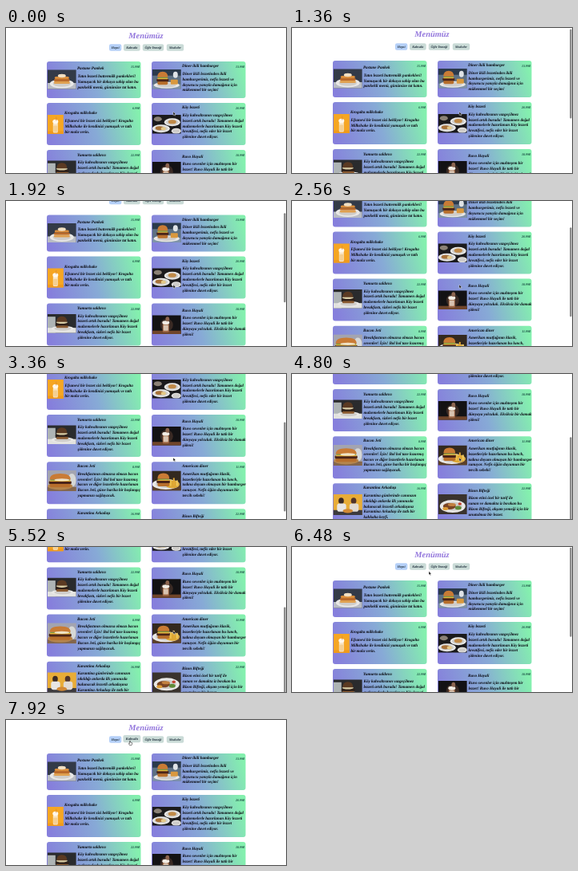
Animation, 350 px wide and 182 px high, one loop 8000 ms. Source, as an HTML page:

```html
<!DOCTYPE html>
<html lang="tr">
<head>
<meta charset="utf-8">
<title>Menümüz</title>
<style>
html, body { margin: 0; width: 100%; height: 100%; overflow: hidden; background: #fff; }
svg { display: block; width: 100vw; height: 100vh; }
text { font: italic bold 5.2px "Liberation Serif", "Noto Serif", serif; letter-spacing: -.06px; fill: #08080e; text-rendering: geometricPrecision; }
.heading { font-size: 10.4px; letter-spacing: 0; fill: #9275dc; text-anchor: middle; }
.label { font-size: 4.2px; text-anchor: middle; fill: #23333f; }
.price { font-size: 4.2px; text-anchor: end; fill: #1c5145; }
</style>
</head>
<body>
<svg id="stage" viewBox="0 0 350 182" xmlns="http://www.w3.org/2000/svg">
  <defs>
    <linearGradient id="card" x1="0" y1=".56" x2="1" y2=".44">
      <stop offset="0" stop-color="#867fdc"/>
      <stop offset=".5" stop-color="#87aad6"/>
      <stop offset="1" stop-color="#84f0ae"/>
    </linearGradient>
  </defs>
  <g id="page"></g>
  <rect id="thumb" x="347.4" width="2" height="112" rx="1" fill="#777"/>
  <g id="pointer">
    <path id="arrow" d="M0 0V4.6L1.1 3.6 1.9 5.2 2.6 4.9 1.9 3.3H3.3Z" fill="#111" stroke="#fff" stroke-width=".4"/>
    <path id="hand" d="M-.5 .3Q0 -.4 .5 .3V2.1L2.7 2.7V4.1L2 5.7H-.4L-1.8 3.5-1.2 3-.5 3.6Z" fill="#fff" stroke="#111" stroke-width=".5"/>
  </g>
</svg>
<script>
const LOOP = 8000;
const $ = id => document.getElementById(id);
const page = $('page');

function add(parent, tag, attrs, content) {
  const el = document.createElementNS('http://www.w3.org/2000/svg', tag);
  for (const key in attrs) el.setAttribute(key, attrs[key]);
  if (content) el.textContent = content;
  parent.appendChild(el);
  return el;
}

// Food pieces inside a 36 x 25 photo
const oval = (x, y, rx, ry, fill) => g => add(g, 'ellipse', { cx: x, cy: y, rx, ry, fill });
const box = (x, y, w, h, fill, r = 0) => g => add(g, 'rect', { x, y, width: w, height: h, fill, rx: r });
const group = (...parts) => g => parts.forEach(part => part(g));
const plate = (x, y, rx, ry) => group(oval(x, y, rx, ry, '#e9e8e6'), oval(x, y, rx * .75, ry * .7, '#cfcdca'));
const bun = (x, y, w, fill) => g =>
  add(g, 'path', { d: `M${x - w / 2} ${y}q0-7 ${w / 2}-7t${w / 2} 7Z`, fill });
const burger = (x, y, w) => group(
  box(x - w / 2, y + 3, w, 4.5, '#b86f2c', 2),
  box(x - w / 2 - 1, y, w + 2, 3.5, '#4b2418', 1),
  box(x - w / 2, y - 1, w, 1.6, '#e9b53c', .6),
  box(x - w / 2 + .5, y - 2.2, w - 1, 1.4, '#7a9b3f', .6),
  bun(x, y - 2, w, '#c97b35')
);

const photos = [
  ['#333a48', box(0, 17, 36, 8, '#b9bcc4'), plate(18, 18, 15, 5.5), box(9, 9, 18, 3, '#d98d3c', 1.5),
    box(8, 12, 20, 3, '#b96a2b', 1.5), box(8, 15, 20, 3, '#dfa050', 1.5), oval(18, 8, 5, 2.2, '#f1dfc2')],
  ['#5d7083', box(0, 0, 36, 8, '#2b3a4c'), box(0, 19, 36, 6, '#7f93a8'), plate(18, 20, 16, 4), burger(13, 12, 13),
    box(23, 13, 9, 6, '#d9983e', 1), oval(29, 7, 3, 4, '#dfe3e6')],
  ['#f6a623', box(0, 21, 20, 4, '#f09a1c'), box(7, 10, 6, 13, '#f9e5c4', 1.5), box(7.5, 14, 5, 8, '#f4cf92', 1),
    oval(10, 9, 3.5, 2.8, '#fff8ec'), box(10.6, 3, .8, 5, '#d98a35')],
  ['#1b1a1c', plate(11, 18, 11, 5), plate(25, 10, 10, 5), plate(30, 21, 6, 3.5), oval(9, 17.5, 5, 2.4, '#a8723a'),
    oval(14, 18, 3, 2, '#e4c988'), oval(25, 9.5, 5, 2.6, '#c08a48'), oval(7, 6, 5, 3, '#8b8176')],
  ['#2a2b2d', box(0, 4, 10, 21, '#aeb4b5'), box(0, 18, 36, 7, '#e2e2df'), plate(19, 19, 14, 3.5),
    box(11, 15, 15, 3, '#8a5a30', 1.5), box(10, 12, 17, 3, '#2f2019', 1.5), oval(18, 11, 7, 1.8, '#d8cda6'),
    bun(18, 10.5, 13, '#5b3a22')],
  ['#131214', box(0, 20, 36, 5, '#70452a'), oval(18, 13, 8, 8, '#3a2a24'), box(13, 11, 8, 11, '#a06a48', 1.5),
    box(14, 13, 6, 7, '#d8c3b0', 1), oval(17, 10, 4.5, 2.4, '#f1ece4'), oval(19, 5.5, 2.4, 3, '#8c6550')],
  ['#a3a4b0', box(0, 20, 36, 5, '#83664d'), oval(30, 12, 5, 8, '#d6d8d7'), oval(16, 19, 15, 4.5, '#b5854c'),
    burger(16, 13, 25), oval(18, 11.5, 9, 1.6, '#efe2c6')],
  ['#33291f', box(0, 19, 36, 6, '#5c4028'), plate(17, 17, 17, 6.5), oval(25, 17, 9, 5, '#dda734'), burger(14, 12, 15),
    box(22, 11, 2, 8, '#edc14d'), box(26, 9, 2, 9, '#e2a936'), box(30, 12, 2, 7, '#f0cb62')],
  ['#e8ac37', box(0, 19, 36, 6, '#3c3a3e'), oval(10, 8, 3.2, 3.8, '#3b2a24'), box(5, 11, 11, 10, '#e8e6e4', 3),
    oval(25, 8, 3.2, 3.8, '#50342a'), box(20, 11, 11, 10, '#e1dbd3', 3), oval(18, 20, 6, 2.5, '#d28a36')],
  ['#3a332d', plate(18, 15, 16, 8), oval(14, 15, 8, 4, '#7a4424'), oval(17, 13, 5, 2, '#c28140'),
    oval(25, 17, 4, 2.5, '#5f8a38'), oval(9, 18, 3.5, 2, '#dd9c37'), oval(27, 12, 2.2, 1.8, '#c5422f')]
];

// title, price, title centre, photo top, photo height, text
const dishes = [
  ['Pastane Pankek', '15.99₺', 51, 52.5, 24, 'Tatın lezzeti buttermilk pankekleri!|Yumuşacık bir dokuya sahip olan bu|pankekli menü, gününüze tat katın.'],
  ['Diner ikili hamburger', '13.99₺', 48, 52, 24.5, 'Diner ikili lezzetinden ikili|hamburgerimiz, nefis lezzeti ve|doyurucu yanıyla damağınız için|mükemmel bir seçim!'],
  ['Krogalta milkshake', '6.99₺', 107, 109, 24, 'Efsanevi bir lezzet sizi bekliyor! Krogalta|Milkshake ile kendinizi yumuşak ve tatlı|bir mola verin.'],
  ['Köy lezzeti', '20.99₺', 100, 109, 23.5, 'Köy kahvaltısının vazgeçilmez|lezzeti artık burada! Tamamen doğal|malzemelerle hazırlanan Köy lezzeti|kreatifesi, nefis eder bir lezzet|şölenine davet ediyor.'],
  ['Yumurta saldırısı', '22.99₺', 159.5, 166.5, 23.5, 'Köy kahvaltısının vazgeçilmez|lezzeti artık burada! Tamamen doğal|malzemelerle hazırlanan Köy lezzeti|breakfastı, sizleri nefis bir lezzet|şölenine davet ediyor.'],
  ['Ruvo Hayali', '18.99₺', 161.7, 168, 23.5, 'Ruvo sevenler için muhteşem bir|lezzet! Ruvo Hayali ile tatlı bir|dünyaya yolculuk. Eksiksiz bir damak|şöleni!'],
  ['Bacon Jeti', '8.99₺', 218, 223, 26, 'Breakfastının olmazsa olmazı bacon|sevenler! İçin! Bol bol taze kızarmış|bacon ve diğer lezzetlerle hazırlanan|Bacon Jeti, güne harika bir başlangıç|yapmanızı sağlayacak.'],
  ['American diner', '11.99₺', 218, 223.5, 25, 'Amerikan mutfağının klasik,|lezzetleriyle hazırlanan bu lunch,|tadına doyum olmayan bir hamburger|sunuyor. Nefis öğün duyumun bir|tercih sebebi!'],
  ['Karantina Arkadaşı', '16.99₺', 277, 285, 26, 'Karantina günlerinde canınızın|sıkıldığı anlarda ilk yanınızda|bulunacak lezzetli arkadaşınız|Karantina Arkadaşı ile tatlı bir|kahkaha keyfi.'],
  ['Bizon Bifteği', '22.99₺', 280.5, 285, 25, 'Bizon etini özel bir tarif ile|sunan ve damakta iz bırakan bu|Bizon Bifteği, akşam yemeği için bir|unutulmaz bir lezzet.']
];

function drawDish([title, price, titleY, photoY, photoH, copy], i) {
  const row = i >> 1;
  const x = i % 2 ? 182 : 51;
  const y = row ? 94 + (row - 1) * 59.1 : 42;
  const photoW = i === 2 ? 20 : 36;
  const textX = x + photoW + 2;
  add(page, 'rect', { x, y, width: 117.5, height: row ? 53 : 46, rx: 3, fill: 'url(#card)' });
  const photo = add(page, 'svg', {
    x: x + .8, y: photoY, width: photoW, height: photoH,
    viewBox: `0 0 ${photoW} 25`, preserveAspectRatio: 'xMidYMid slice'
  });
  const [back, ...parts] = photos[i];
  box(0, 0, 36, 25, back)(photo);
  parts.forEach(part => part(photo));
  add(page, 'text', { x: textX, y: titleY + 1.4 }, title);
  add(page, 'text', { x: x + 116.3, y: y + 8, class: 'price' }, price);
  copy.split('|').forEach((line, n) =>
    add(page, 'text', { x: textX + .5, y: titleY + 10.6 + n * 6.95 }, line));
}

function drawButton([label, x, w], i) {
  const g = add(page, 'g', {});
  add(g, 'rect', { x, y: 20.2, width: w, height: 8.6, rx: 2, fill: i ? '#cadbd7' : '#b5d0f8' });
  add(g, 'text', { x: x + w / 2, y: 25.9, class: 'label' }, label);
  return g;
}

add(page, 'text', { x: 175, y: 12.5, class: 'heading' }, 'Menümüz');
const buttons = [['Hepsi', 129, 15.3], ['Kahvaltı', 147, 20.7], ['Öğle Yemeği', 170.8, 26.4], ['Shakeler', 200.8, 21.4]].map(drawButton);
dishes.forEach(drawDish);

const clamp = v => Math.max(0, Math.min(1, v));
const smooth = v => v * v * (3 - 2 * v);

// Value of a keyed track [time, value] at time t
function track(keys, t, ease = v => v) {
  let n = 1;
  while (n < keys.length - 1 && t > keys[n][0]) n++;
  const [t0, a] = keys[n - 1], [t1, b] = keys[n];
  return a + (b - a) * ease(clamp((t - t0) / (t1 - t0)));
}

const scrollKeys = [[1240, 0], [1360, 1], [1600, 9], [2560, 55.5], [3360, 102], [4200, 134]];
const pointerX = [[5500, 209], [6440, 171], [7040, 171], [7760, 155]];
const pointerY = [[5500, 105], [6440, 30.5], [7040, 30.5], [7760, 26]];

function render(t) {
  const scroll = t < 5400 ? track(scrollKeys, t) : track([[5400, 134], [6320, 0]], t, smooth);
  page.setAttribute('transform', `translate(0 ${-scroll})`);

  $('thumb').setAttribute('y', .8 + scroll * .585);
  $('thumb').setAttribute('opacity', clamp((t - 1200) / 100) * clamp((7000 - t) / 240));

  const x = track(pointerX, t, smooth), y = track(pointerY, t, smooth);
  $('pointer').setAttribute('transform', `translate(${x} ${y})`);
  const hover = smooth(clamp((t - 7400) / 200));
  $('arrow').style.display = hover ? 'none' : '';
  $('hand').style.display = hover ? '' : 'none';
  const s = 1 + .06 * hover;
  buttons[1].setAttribute('transform', `translate(157.3 ${24.5 - .9 * hover}) scale(${s}) translate(-157.3 -24.5)`);
}

const start = performance.now();
function tick() {
  render((performance.now() - start) % LOOP);
  requestAnimationFrame(tick);
}
tick();
</script>
</body>
</html>
```
